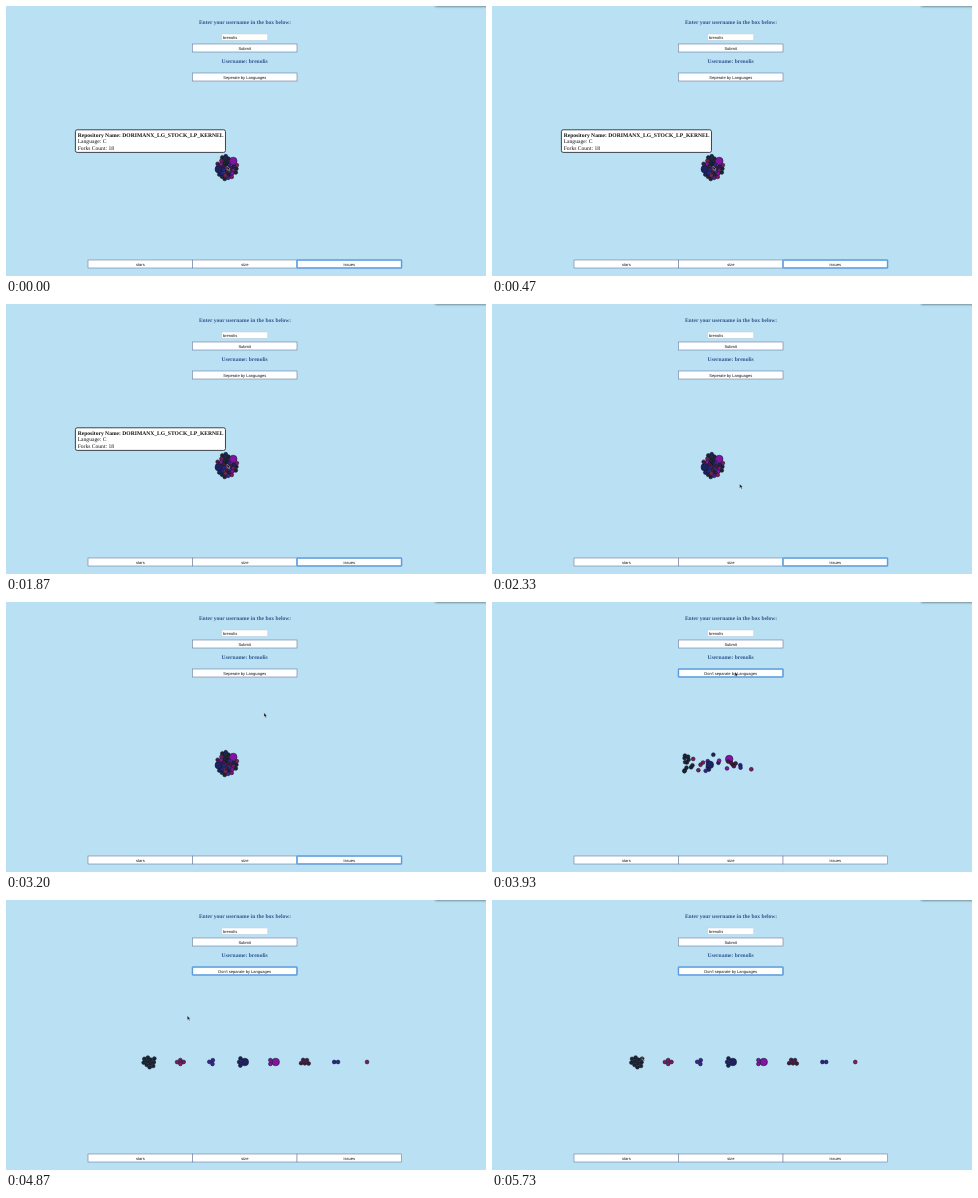
An HTML page for the animation above (5790 ms loop, 480 by 270 pixels).

```html
<!DOCTYPE html>
<html lang="en">
<head>
<meta charset="utf-8">
<title>Repository bubbles</title>
<style>
html, body { margin: 0; width: 100%; height: 100%; overflow: hidden; background: #b9e1f3; }
svg { display: block; width: 100%; height: 100%; }
text { text-rendering: geometricPrecision; }
.head { font: bold 5.55px "Liberation Serif", serif; fill: #31558f; text-anchor: middle; }
.ui { font: 4.05px "Liberation Sans", sans-serif; fill: #111; }
.mid { text-anchor: middle; }
.tip { font: 5.58px "Liberation Serif", serif; fill: #111; }
.bold { font-weight: bold; }
</style>
</head>
<body>
<svg id="stage" viewBox="0 0 480 270" preserveAspectRatio="none"></svg>
<script>
const LOOP = 5790, STEP = 1000 / 15, SPLIT = 3920;
const CENTER = { x: 221, y: 161.7 };
const stage = document.getElementById('stage');

function add(tag, attrs, parent = stage, content = '') {
  const el = document.createElementNS('http://www.w3.org/2000/svg', tag);
  set(el, attrs);
  el.textContent = content;
  parent.appendChild(el);
  return el;
}

function set(el, attrs) {
  for (const key in attrs) el.setAttribute(key, attrs[key]);
}

function show(el, on) {
  el.setAttribute('visibility', on ? 'visible' : 'hidden');
}

function button(x, y, label) {
  const box = { x, y, width: 104.6, height: 8 };
  add('rect', { ...box, fill: '#fdfeff', stroke: '#6c7b9f', 'stroke-width': 0.6 });
  const ring = add('g', { fill: 'none' });
  add('rect', { ...box, rx: 0.6, stroke: '#8fc3ee', 'stroke-width': 1.7 }, ring);
  add('rect', { ...box, rx: 0.4, stroke: '#4a8bd6', 'stroke-width': 0.8 }, ring);
  const text = add('text', { x: x + 52.3, y: y + 5.5, class: 'ui mid' }, stage, label);
  return { ring, text };
}

// Page
add('rect', { width: 480, height: 270, fill: '#b9e1f3' });
add('rect', { x: 429, y: -4, width: 56, height: 4.4, rx: 1, fill: '#5d6f7a', style: 'filter: blur(1px)' });
add('text', { x: 239, y: 17.6, class: 'head' }, stage, 'Enter your username in the box below:');
add('rect', { x: 215.7, y: 28, width: 46, height: 6.2, fill: '#fff', stroke: '#c3ccd4', 'stroke-width': 0.5 });
add('text', { x: 217, y: 32.6, class: 'ui' }, stage, 'brenolis');
add('text', { x: 238.6, y: 56.5, class: 'head' }, stage, 'Username: brenolis');

const submit = button(186.4, 38, 'Submit');
const toggle = button(186.4, 67, '');
const stars = button(82, 254, 'stars');
const size = button(186.5, 254, 'size');
const issues = button(291, 254, 'issues');
[submit, stars, size].forEach(b => show(b.ring, false));

// Bubbles
let seed = 7;
function random() {
  seed = (seed * 16807) % 2147483647;
  return seed / 2147483647;
}

// Pulls discs to the origin while pushing overlapping ones apart
function pack(discs, pullX, pullY, gap) {
  for (let n = 0; n < 150; n++) {
    for (const d of discs) {
      d.x *= 1 - pullX;
      d.y *= 1 - pullY;
    }
    discs.forEach((a, i) => discs.slice(i + 1).forEach(b => {
      const dx = b.x - a.x, dy = b.y - a.y;
      const dist = Math.hypot(dx, dy) || 0.01;
      const push = ((a.r + b.r) * gap - dist) / dist;
      if (push <= 0) return;
      const share = b.r * b.r / (a.r * a.r + b.r * b.r);
      a.x -= dx * push * share;
      a.y -= dy * push * share;
      b.x += dx * push * (1 - share);
      b.y += dy * push * (1 - share);
    }));
  }
  return discs;
}

// Colour per language, number of bubbles, where a large one starts
const groups = [
  ['#1c2530', 11],
  ['#80195c', 4],
  ['#3a239a', 3],
  ['#1d2160', 4, { x: -9.5, y: 0 }],
  ['#8413a3', 3, { x: 7, y: -7.5 }],
  ['#48193a', 5],
  ['#25258c', 2],
  ['#8b1c4d', 1]
];

function ringSpot(i, count, big) {
  const angle = (big ? 0 : Math.PI) + i * 2 * Math.PI / count;
  const radius = 3 + i % 2 * 3;
  return { x: radius * Math.cos(angle), y: radius * Math.sin(angle) };
}

function discSpot() {
  const angle = random() * 2 * Math.PI, radius = 12 * Math.sqrt(random());
  return { x: radius * Math.cos(angle), y: radius * Math.sin(angle) };
}

const bubbles = groups.flatMap(([fill, count, big], g) => {
  const radius = i => big && i === 0 ? 3.9 : 2;
  const spots = pack(
    Array.from({ length: count }, (_, i) => ({ ...ringSpot(i, count, big), r: radius(i) })),
    0.02, 0.045, 0.95);
  return spots.map(({ x, y, r }, i) => ({
    el: add('circle', { r: r - 0.1, fill, stroke: '#111328', 'stroke-width': 0.55 }),
    home: { ...(big && i === 0 ? big : discSpot()), r },
    away: { x: 145 + g * 31.2 + x, y: 162 + y }
  }));
});
pack(bubbles.map(b => b.home), 0.02, 0.02, 0.92);

// Tooltips
function tooltip(name, forks) {
  const g = add('g', {});
  const box = add('rect', { height: 22.6, rx: 1.8, fill: '#fff', stroke: '#20252b', 'stroke-width': 0.85 }, g);
  const lines = ['Repository Name: ' + name, 'Language: C', 'Forks Count: ' + forks];
  const [title] = lines.map((line, i) =>
    add('text', { x: 2.3, y: 6.9 + i * 6.45, class: i ? 'tip' : 'tip bold' }, g, line));
  set(box, { width: title.getComputedTextLength() + 4.2 });
  return g;
}
const kernelTip = tooltip('DORIMANX_LG_STOCK_LP_KERNEL', 18);
const libTip = tooltip('libdc-for-dirk', 21);

const cursor = add('path', {
  d: 'M0 0V4.2L1 3.3L1.8 5L2.6 4.6L1.9 3H3.1Z',
  fill: '#16181c', stroke: '#e6eef4', 'stroke-width': 0.35
});

// Pointer stops: time, x, y
const stops = [
  [2200, 221, 160], [2420, 265, 193], [2800, 269, 229], [3070, 269, 181], [3270, 252, 73],
  [3600, 243, 70], [4060, 243, 70], [4870, 181, 116], [LOOP, 148, 158.5]
];

function pointer(t) {
  const i = Math.max(1, stops.findIndex(s => s[0] > t));
  const [t0, x0, y0] = stops[i - 1], [t1, x1, y1] = stops[i];
  const k = Math.max(0, (t - t0) / (t1 - t0));
  const sway = t > 470 && t < 1000 ? Math.sin((t - 470) / 530 * Math.PI) : 0;
  return { x: x0 + (x1 - x0) * k + 4 * sway, y: y0 + (y1 - y0) * k + sway };
}

function render(time) {
  const t = Math.floor((time % LOOP + 4) / STEP) * STEP;
  const split = t >= SPLIT;
  const p = split ? 1 - Math.exp(-(t - 3876) / 160) : 0;
  const drift = 0.6 - 4.9 * Math.exp(-(t - 4470) / 600);

  for (const { el, home, away } of bubbles) {
    const x = CENTER.x + home.x, y = CENTER.y + home.y;
    set(el, { cx: x + (away.x + drift - x) * p, cy: y + (away.y - y) * p });
  }

  toggle.text.textContent = split ? "Don't separate by Languages" : 'Seperate by Languages';
  show(toggle.ring, split);
  show(issues.ring, !split);

  const { x, y } = pointer(t);
  const onLib = t > 590 && t < 960;
  show(libTip, onLib);
  show(kernelTip, !onLib && t < 2190);
  for (const tip of [libTip, kernelTip]) set(tip, { transform: `translate(${x - 151.6} ${y - 36.2})` });
  set(cursor, { transform: `translate(${x} ${y})` });
}

const start = performance.now();
function tick() {
  render(performance.now() - start);
  requestAnimationFrame(tick);
}
tick();
</script>
</body>
</html>
```
